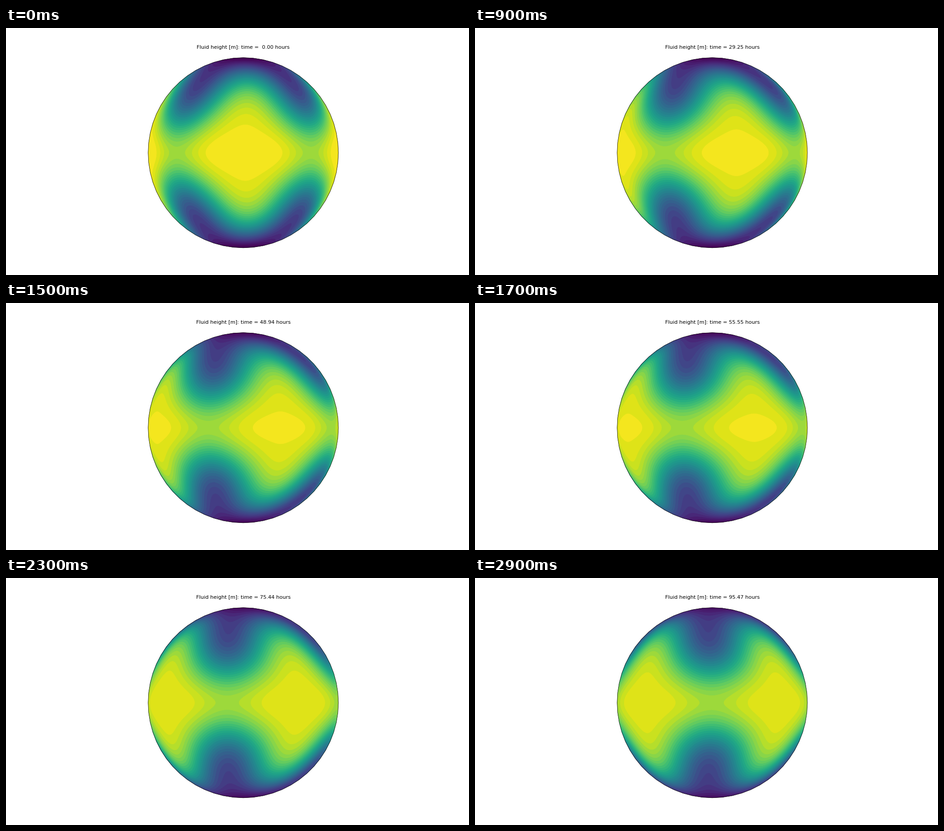
Write a matplotlib script that moves like this. It is 1025 px wide and 547 px high and loops after 3000 ms.

```python
import numpy as np
import matplotlib.pyplot as plt
from matplotlib.animation import FuncAnimation
from matplotlib.patches import Polygon

W, H, DPI = 1025, 547, 64
FRAMES, INTERVAL = 30, 100
CX, CY, RADIUS = 525.3, 276.2, 210.6
PT = 72 / DPI

# Wavenumber-4 Rossby-Haurwitz wave on the Earth
WAVE = 7.848e-6
OMEGA = 7.292e-5
SCALE = 6.37122e6 ** 2 / 9.80616
LEVELS = np.arange(8080, 10561, 80)

# Evolution of the clock, the decay and the drift (degrees) at three latitudes
KEYS = [0, 4, 9, 15, 20, 23, 29]
HOURS = [0, 12.97, 29.25, 48.94, 65.47, 75.44, 95.47]
DECAY = [0, .136, .306, .60, .75, .85, 1]
DRIFT = [
    [0.5, 7.7, 15.0, 23.2, 31.2, 35.2, 44.6],
    [2.5, 6.0, 14.5, 23.0, 29.6, 33.8, 43.0],
    [2.7, 4.0, 6.5, 14.0, 23.0, 29.0, 40.0],
]
DRIFT_SIN2 = [0, .28, .80]

# Orthographic view: points beyond the limb take the value at the limb
axis = np.linspace(-1.01, 1.01, 281)
gx, gy = np.meshgrid(axis, axis)
px, py = CX + RADIUS * gx, CY + RADIUS * gy
rim = np.maximum(1, np.hypot(gx, gy))
sin2 = np.minimum((gy / rim) ** 2, 1 - 1e-6)
cos2 = 1 - sin2
lon = np.arcsin(np.clip(gx / rim / np.sqrt(cos2), -1, 1))


def height(frame):
    decay = np.interp(frame, KEYS, DECAY)
    drift = [np.interp(frame, KEYS, row) for row in DRIFT]
    shift = np.polyval(np.polyfit(DRIFT_SIN2, drift, 2), sin2)
    phase = 4 * (lon - np.radians(shift))

    k2 = WAVE ** 2 / 4 * cos2 ** 4
    mean = (WAVE / 2 * (2 * OMEGA + WAVE) * cos2
            + k2 * (5 * cos2 + 26 - 32 / cos2))
    first = (2 * (OMEGA + WAVE) * WAVE / 30 * cos2 ** 2
             * (1 - .05 * decay) * (25 * sin2 + 1 - .218 * decay))
    second = k2 * (5 * cos2 - 6) * (1 - .5 * decay)
    wave = mean + first * np.cos(phase) + second * np.cos(2 * phase)
    return 8000 + SCALE * wave + decay * (189 * sin2 - 63)


fig = plt.figure(figsize=(W / DPI, H / DPI), dpi=DPI, facecolor="white")
ax = fig.add_axes([0, 0, 1, 1])
ax.set_xlim(0, W)
ax.set_ylim(H, 0)
ax.axis("off")

angles = np.radians(np.arange(0, 360, 6))
limb = Polygon(np.c_[CX + RADIUS * np.cos(angles), CY + RADIUS * np.sin(angles)],
               fill=False, edgecolor="black", linewidth=.76 * PT, zorder=5)
ax.add_patch(limb)
title = ax.text(CX, 45.8, "", ha="center", va="baseline",
                family="DejaVu Sans", fontsize=11.39 * PT)
layers = []


def update(frame):
    while layers:
        layers.pop().remove()
    field = height(frame)
    # The hard-edged layer below hides seams between the smoothed bands
    for smooth in (False, True):
        bands = ax.contourf(px, py, field, levels=LEVELS, cmap="viridis",
                            vmin=LEVELS[0], vmax=LEVELS[-1], extend="both",
                            antialiased=smooth, zorder=1 + smooth)
        bands.set_clip_path(limb)
        layers.append(bands)
    ax.set_xlim(0, W)
    ax.set_ylim(H, 0)
    hours = np.interp(frame, KEYS, HOURS)
    title.set_text(f"Fluid height [m]: time = {hours:5.2f} hours")
    return [*layers, title]


anim = FuncAnimation(fig, update, frames=FRAMES, interval=INTERVAL,
                     init_func=lambda: [], repeat=True, repeat_delay=0, blit=False)
plt.show()
```
